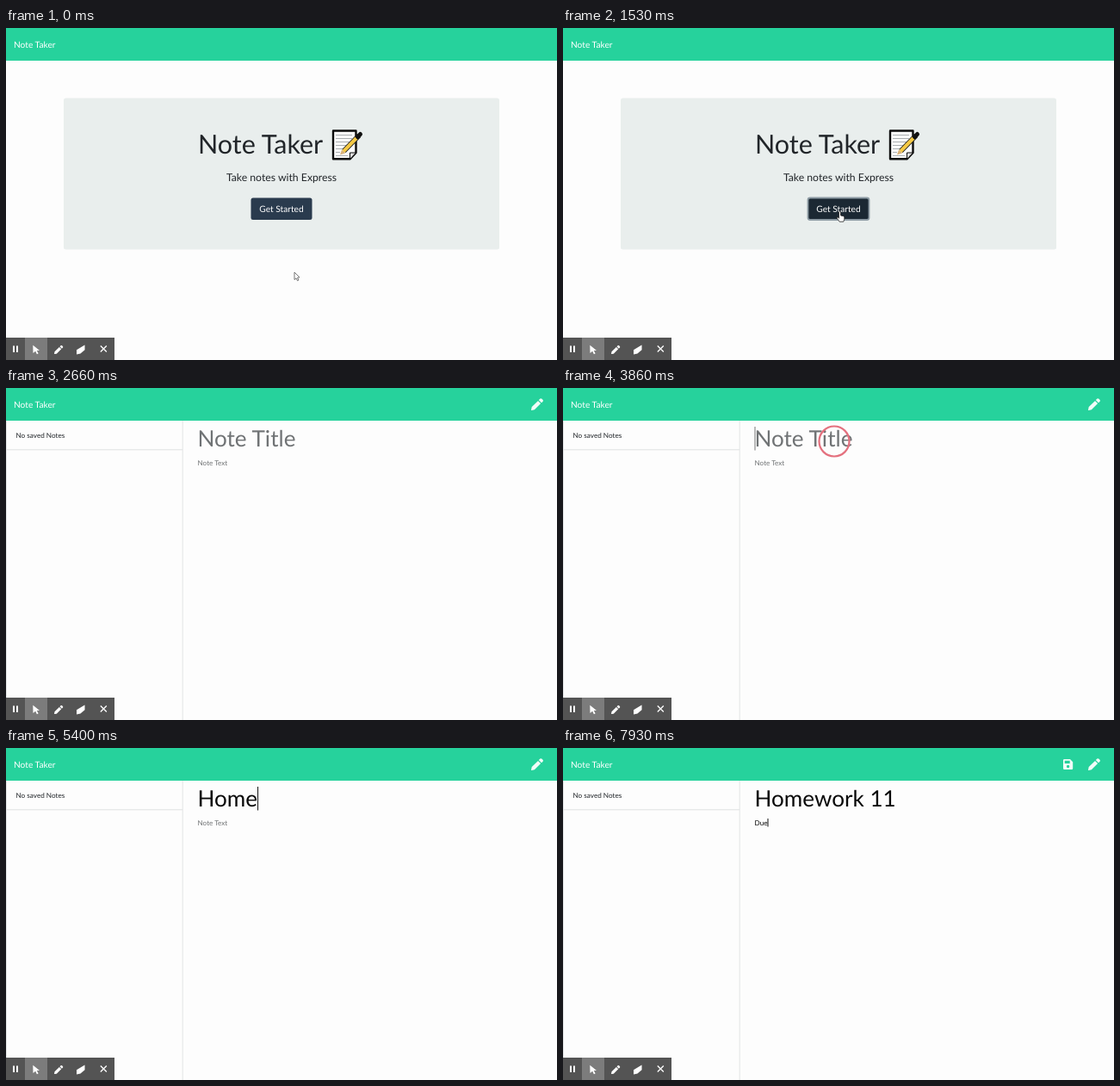
An HTML page for the animation above (8 s loop, 640 by 386 pixels).

```html
<!DOCTYPE html>
<html lang="en">
<head>
<meta charset="utf-8">
<title>Note Taker</title>
<style>
  html, body { margin: 0; width: 100%; height: 100%; overflow: hidden; background: #fdfdfd; }
  svg { display: block; width: 640px; height: 386px; }
  text { font: 8.16px Lato, sans-serif; fill: #212529; white-space: pre; text-rendering: geometricPrecision; }
  .mid { text-anchor: middle; }
  .brand, .button { font-size: 10.2px; fill: #fff; }
  .lead { font-size: 12.24px; }
  .heading { font-size: 30.5px; }
  #title { font-size: 26.1px; }
</style>
</head>
<body>
<svg viewBox="0 0 640 386">
  <defs>
    <path id="pencil" d="M8 3 11.1 6.1 3.8 13.3.4 13.9Q-.1 13.9 0 13.4L.7 10ZM8.8 2.1 10.3.6q1-.9 2 0l1.2 1.2q.9 1 0 2L12 5.3Z"/>
  </defs>
  <rect width="640" height="386" fill="#fdfdfd"/>
  <rect width="640" height="38" fill="#26d29c"/>
  <text class="brand" x="9" y="22.6">Note Taker</text>

  <g id="home">
    <rect x="67" y="81.5" width="506" height="176" rx="2.5" fill="#e9eeed"/>
    <text class="heading" x="223" y="146">Note Taker</text>
    <g stroke-linejoin="round">
      <path d="M380 119.5H406.5V145L399.5 152.3H380Z" fill="#fcfcfc" stroke="#0c0c0c" stroke-width="2.4"/>
      <path d="M383 124.5H402M383 128.5H402M383 132.5H400M383 136.5H396M383 140.5H391M383 144.5H388M383 148.5H397" stroke="#a9adb0"/>
      <path d="M399.5 152V145H406" fill="#ddd" stroke="#0c0c0c"/>
      <path d="M410 125 392.5 143" stroke="#222" stroke-width="6"/>
      <path d="M407 128 392 143.5" stroke="#f5c945" stroke-width="4"/>
      <path d="M390 141.5 394 145.5 388 147.5Z" fill="#d9b27a"/>
      <path d="M411.5 123.5 408.5 126.5" stroke="#111" stroke-width="5" stroke-linecap="round"/>
    </g>
    <text class="lead mid" x="320" y="177.6">Take notes with Express</text>
    <rect id="button" x="284.5" y="197.5" width="71" height="25.5" rx="2.5"/>
    <text class="button mid" x="320" y="214.1">Get Started</text>
  </g>

  <g id="notes">
    <path d="M.5 38V386M205.2 38V386" stroke="#e2e4e5"/>
    <g id="loaded">
      <path d="M0 71.8H205" stroke="#dfe1e2"/>
      <text x="11.5" y="58.2">No saved Notes</text>
      <use href="#pencil" x="610" y="12" fill="#f1fcf8"/>
    </g>
    <path id="save" fill="#f1fcf8" fill-rule="evenodd"
      d="M582.2 13H589L592.2 16.2V23.8Q592.2 25 591 25H582.2Q581 25 581 23.8V14.2Q581 13 582.2 13ZM582.7 14.7V18H588.7V14.7ZM586.6 19.8A1.7 1.7 0 1 0 586.6 23.2 1.7 1.7 0 1 0 586.6 19.8Z"/>
    <text id="title" x="222.5" y="68.2"></text>
    <text id="body" x="222.5" y="89.7"></text>
    <rect id="caret" width="1"/>
  </g>

  <g>
    <rect y="360" width="126" height="26" fill="#545454"/>
    <rect x="22" y="360" width="26" height="26" fill="#7c7c7c"/>
    <g fill="#fff">
      <path d="M8 369.5h2v7.5h-2zM12 369.5h2v7.5h-2z"/>
      <path d="M31.3 368.8 39 375H35.8L37.6 378.6 35.9 379.3 34.2 375.8 31.5 378Z"/>
      <use href="#pencil" transform="translate(56 368.8) scale(.74)"/>
      <path d="M82 374.2 91.5 368.5V374.2L86.5 378.5 82 379.5Z"/>
    </g>
    <path d="M109.8 369.5 116.8 376.5M116.8 369.5 109.8 376.5" stroke="#fff" stroke-width="1.3"/>
  </g>

  <circle id="ring" r="17.5" fill="none" stroke="#e4707e" stroke-width="2.2"/>
  <path id="arrow" d="M0 0V8.6L2 6.9 3.5 9.8 4.9 9.1 3.5 6.3 6 5.9Z" fill="#fff" stroke="#555" stroke-width=".8"/>
  <path id="hand" d="M-1 .9Q0-.5 1 .9V5L4.2 5.7Q5.4 6 5.3 7.2V9.3L4.3 12.2H-.3L-3.4 8.1Q-3.5 6.5-2.2 7L-1 8.2Z" fill="#fff" stroke-width=".8"/>
</svg>
<script>
  const LOOP = 8000, PAGE_AT = 1660;
  const titleKeys = [4800, 5130, 5260, 5330, 5530, 5600, 5730, 5860, 6000, 6130, 6400];
  const bodyKeys = [7600, 7730, 7930];
  const clicks = [[1330, 320, 213], [3860, 315, 62], [6930, 315, 104]];

  const el = id => document.getElementById(id);
  const set = (id, attrs) => { for (const k in attrs) el(id).setAttribute(k, attrs[k]); };
  const show = (id, on) => { el(id).style.display = on ? '' : 'none'; };
  const clamp = v => Math.max(0, Math.min(1, v));
  const ease = v => v * v * (3 - 2 * v);

  // Fills a field with the keys pressed so far and returns the text width.
  function type(id, word, keys, hint, t) {
    const text = word.slice(0, keys.filter(k => k <= t).length);
    el(id).textContent = text || hint;
    el(id).style.fill = text ? '#0a0a0a' : '#707375';
    return text ? el(id).getComputedTextLength() : 0;
  }

  function drawPointer(t) {
    const p = ease(clamp((t - 60) / 600));
    const x = 335 - 13.5 * p, y = 284 - 71 * p;
    const over = y < 222;
    show('arrow', !over);
    show('hand', over && t < 2600);
    set('arrow', { transform: `translate(${x} ${y})` });
    set('hand', { transform: `translate(${x} ${y})`, stroke: t < PAGE_AT ? '#222' : '#777' });
    set('button', {
      fill: over ? '#1b2833' : '#2a3b4e',
      stroke: t >= 1330 ? '#8c9aa3' : 'none',
      'stroke-width': 1.8
    });
  }

  function drawRing(t) {
    const click = clicks.find(([at]) => t >= at && t < at + 200);
    show('ring', click);
    if (click) set('ring', { cx: click[1], cy: click[2], opacity: 1 - clamp((t - click[0] - 70) / 130) });
  }

  function drawNotes(t) {
    const titleWidth = type('title', 'Homework 11', titleKeys, 'Note Title', t);
    const bodyWidth = type('body', 'Due', bodyKeys, 'Note Text', t);
    const inBody = t >= 6930;
    show('loaded', t >= 1800);
    show('save', t >= bodyKeys[0]);
    show('caret', t >= 3860 && !(t >= 4430 && t < 4800));
    set('caret', {
      x: 222.5 + (inBody ? bodyWidth : titleWidth),
      y: inBody ? 82 : 45,
      height: inBody ? 9.5 : 27.5,
      fill: t < 3930 || (t >= 4400 && t < 4430) ? '#777' : '#111'
    });
  }

  function frame(now) {
    const t = now % LOOP;
    show('home', t < PAGE_AT);
    show('notes', t >= PAGE_AT);
    drawPointer(t);
    drawRing(t);
    drawNotes(t);
    requestAnimationFrame(frame);
  }
  frame(0);
</script>
</body>
</html>
```
